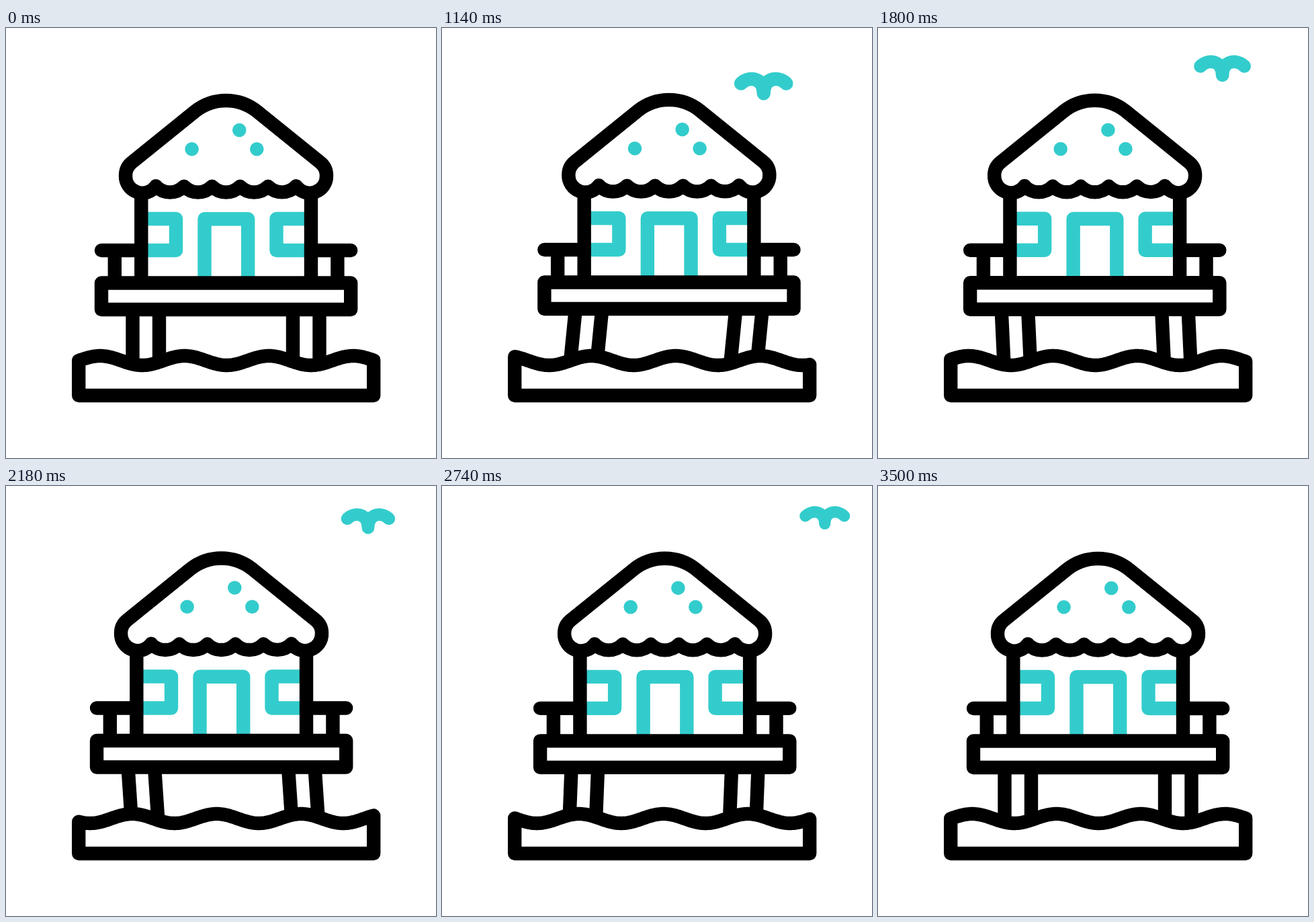
An HTML page with a canvas for the animation above (3.6 s loop, 640 px wide and 640 px high).

```html
<!DOCTYPE html>
<html lang="en">
<head>
<meta charset="utf-8">
<title>Stilt hut</title>
<style>
  html, body { margin: 0; width: 100%; height: 100%; overflow: hidden; background: #fff; }
  canvas { display: block; width: 640px; height: 640px; }
  svg { position: absolute; width: 0; height: 0; }
</style>
</head>
<body>
<canvas id="stage" width="640" height="640"></canvas>
<svg><path id="flight" d="M473 104.5 c4 -41 58 -54 106.5 -58"/></svg>
<script>
const LOOP = 3600, START = 120, END = 3500;
const BLACK = '#000', TEAL = '#33cccc', WHITE = '#fff';
const ctx = document.getElementById('stage').getContext('2d');
const flight = document.getElementById('flight');
const flightLength = flight.getTotalLength();

const clamp = v => Math.min(1, Math.max(0, v));
const progress = (t, from, to) => clamp((t - from) / (to - from));
const mix = (a, b, u) => a + (b - a) * u;
const sineEase = u => (1 - Math.cos(Math.PI * u)) / 2;

// Cubic Bezier timing with handles (x1, 0) and (x2, 1).
function bezierEase(u, x1, x2) {
  let lo = 0, hi = 1;
  for (let i = 0; i < 24; i++) {
    const s = (lo + hi) / 2, r = 1 - s;
    const x = 3 * r * r * s * x1 + 3 * r * s * s * x2 + s * s * s;
    if (x < u) lo = s; else hi = s;
  }
  return lo * lo * (3 - 2 * lo);
}

// Sideways sway of the hut: [time, offset]
const SWAY = [[START, 0], [850, 10.5], [1310, 10.3], [2000, -8.5], [2800, 4.3], [END, 0]];

function swayAt(t) {
  for (let i = 1; i < SWAY.length; i++) {
    const [t0, a] = SWAY[i - 1], [t1, b] = SWAY[i];
    if (t < t1) return mix(a, b, sineEase(progress(t, t0, t1)));
  }
  return 0;
}

function stroke(d, color) {
  ctx.strokeStyle = color;
  ctx.stroke(new Path2D(d));
}

function dot(x, y) {
  ctx.beginPath();
  ctx.arc(x, y, 10.3, 0, 2 * Math.PI);
  ctx.fill();
}

function roofPath() {
  const step = 41.72;
  let d = 'M223.2 235.3 A25 25 0 0 1 178 219.5 A25 25 0 0 1 187.4 200'
        + ' L281.5 124 A74 74 0 0 1 373.5 124'
        + ' L467.6 200 A25 25 0 0 1 477 219.5 A25 25 0 0 1 431.8 235.3';
  for (let i = 1; i <= 5; i++) d += ` A29 29 0 0 1 ${431.8 - i * step} 235.7`;
  return d + 'Z';
}
const ROOF = roofPath();

function drawLegs(dx, dy) {
  ctx.lineCap = 'butt';
  for (const x of [188.5, 228, 427, 466.5]) {
    stroke(`M${x + dx} ${419 + dy} L${x} 522`, BLACK);
  }
}

function drawHut(dx, dy) {
  ctx.save();
  ctx.translate(dx, dy);
  ctx.lineCap = 'butt';
  stroke('M201 284 H253 V331 H201 M454 284 H402.5 V331 H454', TEAL);
  stroke('M295.5 379 V284.3 H360.2 V379', TEAL);
  stroke('M201.3 244 V379 M454 244 V379 M161.8 331 V379 M493.4 331 V379', BLACK);
  stroke('M142 379.5 H513.2 V419 H142 Z', BLACK);
  ctx.lineCap = 'round';
  stroke('M142 331 H201 M454 331 H513.2', BLACK);
  ctx.fillStyle = WHITE;
  ctx.fill(new Path2D(ROOF));
  stroke(ROOF, BLACK);
  ctx.fillStyle = TEAL;
  dot(276.6, 180.3);
  dot(347.3, 152);
  dot(373.3, 180.3);
  ctx.restore();
}

function drawWater(t) {
  const left = 108.2, right = 547.2, bottom = 547, wave = 125.6, steps = 220;
  const shift = -3 * wave * bezierEase(progress(t, START, END), 0.562, 0.672);
  ctx.beginPath();
  ctx.moveTo(left, bottom);
  for (let i = 0; i <= steps; i++) {
    const x = mix(left, right, i / steps);
    ctx.lineTo(x, 495 - 7 * Math.cos(2 * Math.PI * (x - 140 - shift) / wave));
  }
  ctx.lineTo(right, bottom);
  ctx.closePath();
  ctx.fillStyle = WHITE;
  ctx.fill();
  ctx.strokeStyle = BLACK;
  ctx.stroke();
}

function drawBird(t) {
  const alpha = progress(t, 150, 500) * (1 - progress(t, 3050, 3340));
  if (!alpha) return;
  const along = sineEase(progress(t, 450, 3230));
  const pos = flight.getPointAtLength(along * flightLength);
  const size = 1 - 0.18 * along * along;
  const flap = (1 - Math.cos(2 * Math.PI * (t - 700) / 520)) / 2;
  const tipX = mix(34.3, 32, flap), tipY = mix(-3, -7.5, flap);
  const bendX = mix(24, 19, flap), bendY = mix(-14, -18.5, flap);
  const tail = mix(10, 14, flap);

  ctx.save();
  ctx.globalAlpha = alpha;
  ctx.translate(pos.x, pos.y);
  ctx.scale(size, size);
  ctx.lineCap = 'round';
  stroke(`M${-tipX} ${tipY} C${-bendX} ${bendY} 0 -14 0 ${tail}`
       + ` C0 -14 ${bendX} ${bendY} ${tipX} ${tipY}`, TEAL);
  ctx.restore();
}

function draw(t) {
  const dx = swayAt(t), dy = -0.01 * dx * dx;
  ctx.fillStyle = WHITE;
  ctx.fillRect(0, 0, 640, 640);
  ctx.lineWidth = 20.4;
  ctx.lineJoin = 'round';
  drawBird(t);
  drawLegs(dx, dy);
  drawHut(dx, dy);
  drawWater(t);
}

let begin;
function frame(now) {
  begin ??= now;
  draw((now - begin) % LOOP);
  requestAnimationFrame(frame);
}
draw(0);
requestAnimationFrame(frame);
</script>
</body>
</html>
```
